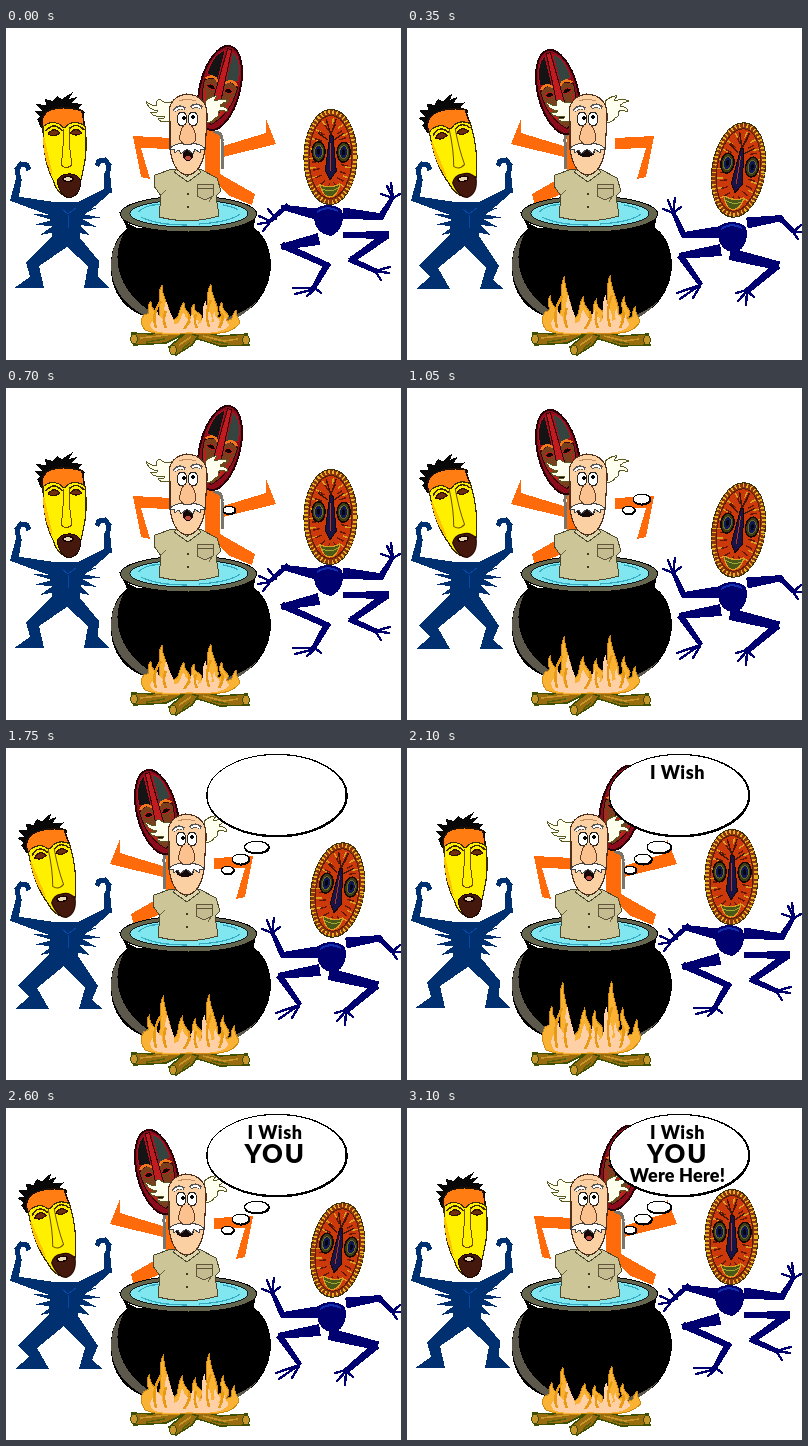
These frames come from a looping animation (395x332 px, 5.1 s). An HTML page:

```html
<!DOCTYPE html>
<html lang="en">
<head>
<meta charset="utf-8">
<title>I Wish You Were Here</title>
<style>
html, body { margin: 0; width: 100%; height: 100%; overflow: hidden; background: #fff; }
svg { display: block; width: 100vw; height: 100vh; shape-rendering: crispEdges; }
text { font-family: Lato, "Open Sans", sans-serif; font-weight: 900; text-anchor: middle; }
</style>
</head>
<body>
<svg id="stage" viewBox="0 0 395 332"></svg>
<script>
const stage = document.getElementById('stage');
const NAVY = '#003070', BLUE = '#000070', ORANGE = '#ff6a0a', OLIVE = '#5a5a20';

const path = (d, fill, stroke = 'none', w = 1) =>
  `<path d="${d}" fill="${fill}" stroke="${stroke}" stroke-width="${w}" stroke-linejoin="round"/>`;
const line = (d, stroke, w = 1, extra = '') =>
  `<path d="${d}" fill="none" stroke="${stroke}" stroke-width="${w}" ${extra}/>`;
const oval = (x, y, rx, ry, fill, stroke = 'none', w = 1, extra = '') =>
  `<ellipse cx="${x}" cy="${y}" rx="${rx}" ry="${ry}" fill="${fill}" stroke="${stroke}" stroke-width="${w}" ${extra}/>`;
const group = (id, body) => `<g id="${id}">${body}</g>`;
const move = (body, transform) => `<g transform="${transform}">${body}</g>`;
const at = (body, x, y, turn) => move(body, `translate(${x} ${y}) rotate(${turn})`);

// Limb segment that narrows from width w1 to w2
function taper(x1, y1, w1, x2, y2, w2, fill) {
  const len = Math.hypot(x2 - x1, y2 - y1), nx = (y1 - y2) / len / 2, ny = (x2 - x1) / len / 2;
  return path(`M${x1 + nx * w1} ${y1 + ny * w1}L${x2 + nx * w2} ${y2 + ny * w2}` +
    `L${x2 - nx * w2} ${y2 - ny * w2}L${x1 - nx * w1} ${y1 - ny * w1}Z`, fill);
}

// Long dark red mask, drawn around 0,0
const redMask = [
  oval(0, 0, 20, 43, '#8c0c1c', '#280008', 2),
  path('M-4-38Q-15-32-16-11L-4-7Z', '#141414', '#b01020'),
  path('M4-38Q15-32 16-11L4-7Z', '#34443f', '#b01020'),
  path('M-17-4Q-9-12 0-3Q9-12 17-4Q17 22 0 38Q-17 22-17-4Z', '#7a3f1c', '#300808'),
  line('M-16-6Q-9-13-3-5M16-6Q9-13 3-5', '#f07818', 2.5),
  path('M-14 1Q-9-5-4 2Q-9 5-14 1ZM14 1Q9-5 4 2Q9 5 14 1Z', '#100808', '#c02018'),
  path('M-2-40H2L4 13H-4Z', '#c01c20', '#300008'),
  line('M-14 6Q-12 20-6 28M14 6Q12 20 6 28', '#c01c20', 2),
  oval(0, 23, 7, 5, '#180808', '#c02a18', 1.5)
].join('');

// Yellow mask with spiky hair
const yellowMask = [
  path('M35 100L31 91L34 89L28 83L36 83L30 76L40 77L39 71L47 73L51 68L56 71L67 64L63 71L71 69L66 75L77 76L72 80L79 84L76 92Z', '#080808'),
  path('M36 98Q35 86 44 82Q58 77 76 83L79 100L72 107L39 108Z', '#ff7d13', '#201000', 1.5),
  path('M37 99Q44 92 53 96L58 100L63 96Q70 92 79 98Q82 123 77 143Q73 166 63 169Q52 168 47 152Q37 134 37 99Z', '#fff000', '#3c2c00', 1.2),
  path('M38 108L47 148Q38 135 37 110Z', '#ffc000'),
  path('M42 106Q48 98 54 105Q48 110 42 106ZM64 105Q70 98 76 105Q70 109 64 105Z', '#703010', '#301000', 1.2),
  line('M40 103Q48 93 56 103M62 102Q70 93 78 102', '#402800', 1.5),
  path('M57 100Q58 120 55 137Q60 142 66 137Q63 120 63 100', '#fff000', '#6e4b00', 1),
  path('M51 153Q54 146 62 146Q71 145 75 153Q74 168 63 170Q54 168 51 153Z', '#44180c', '#200800'),
  oval(62, 151, 5, 2.5, '#e8d8b0', '#180000', 1.5)
].join('');

// Round carved mask, drawn around 0,0
const ring = (rx, ry, c, w, dash) => oval(0, 0, rx, ry, 'none', c, w, `stroke-dasharray="${dash}"`);
const carvedEye = x => oval(x, -5, 6.5, 10, '#3c3c14', '#140800', 1.5) +
  oval(x, -5, 4, 6.5, '#101858', '#6b6b28') + oval(x, -5, 1.6, 3, '#050510');
const carvedMask = [
  oval(0, 0, 26.5, 47.5, '#8c3410', '#403008', 1.2),
  ring(24.5, 45, '#e8b020', 4, '1.6 2.4'),
  oval(0, 0, 21.5, 41.5, '#cc3a0c', '#582009'),
  ring(18, 36, '#d8a020', 6, '1.4 8'),
  ring(15, 30, '#641808', 7, '1.4 6'),
  line('M-5-38L0-22L5-38M-13-24L-3-17M13-24L3-17', '#401808', 1.5),
  carvedEye(-12), carvedEye(13),
  path('M-1-22H2L6 14L0 23L-5 14Z', '#181448', '#180805'),
  line('M0-14V14', '#b03820', 1),
  path('M-10 28Q0 32 10 27Q7 40 0 40Q-7 40-10 28Z', '#4c5818', '#d8a020', 1.2),
  line('M-8 32Q0 36 8 31', '#a0a830')
].join('');

// Back dancer: the second pose mirrors the body
const backBody = path('M127 108L166 110V121L135 120L144 151L135 149Z', ORANGE) +
  path('M199 102L214 104V146L249 166L246 177L224 168L199 145Z', ORANGE) +
  path('M217 118L260 105V91L270 116L217 129Z', ORANGE) +
  line('M207 104Q217 103 216 114V141', '#77756c', 3);
const backA = backBody + at(redMask, 214, 60, 14);
const backB = move(backBody, 'translate(374 0) scale(-1 1)') + at(redMask, 151, 64, -14);

// Left dancer
const ribs = path('M50 182L31 177L47 187L26 186L46 192L28 197L47 198L34 207L50 204' +
  'L43 215L58 208L71 216L68 204L84 207L73 197L91 199L76 191L96 190L76 186L91 180L74 182Z', NAVY) +
  line('M56 181L62 186L70 180M62 187V200', '#0848a8');
const hook = (x, y, side) => line(`M${x} ${y}l${side * -2} -12l${side * 4} -5l${side * 6} 1l${side * 2} 5`, NAVY, 5);
const arms = taper(51, 182, 15, 8, 171, 6, NAVY) + taper(8, 174, 8, 13, 150, 6, NAVY) + hook(13, 153, 1) +
  taper(73, 182, 15, 103, 162, 6, NAVY) + taper(102, 165, 8, 101, 145, 6, NAVY) + hook(101, 149, -1);
const leftA = arms + path('M47 174H76L74 210L93 233L92 248L103 260H78L82 238L61 219L33 238L38 260H8L24 249L20 234L46 208Z', NAVY) +
  ribs + yellowMask;
const leftB = arms + path('M45 174H75L72 208L92 238L86 252L97 261H73L79 240L58 218L31 240L43 261H9L23 249L12 238L43 206Z', NAVY) +
  ribs + move(yellowMask, 'translate(-7 0) rotate(-10 62 145)');

// Right dancer
const bone = (...p) => taper(...p, BLUE);
const fingers = d => line(d, BLUE, 2.4, 'stroke-linecap="round"');
const torso = (x, y) => path(`M${x - 14} ${y - 9}Q${x} ${y - 19} ${x + 14} ${y - 9}Q${x + 18} ${y + 10} ${x + 3} ${y + 17}Q${x - 16} ${y + 14} ${x - 14} ${y - 9}Z`, BLUE) +
  line(`M${x - 11} ${y - 7}Q${x} ${y - 14} ${x + 10} ${y - 8}`, '#1030b0', 2);
const rightA = bone(310, 186, 11, 275, 179, 5) + bone(282, 177, 5, 263, 194, 4) +
  fingers('M264 193L253 188M264 194L252 196M264 194L257 203M270 191L262 181') +
  bone(337, 185, 11, 376, 189, 7) + bone(374, 190, 7, 387, 169, 4) +
  fingers('M387 170L375 166M387 170L381 158M387 170L385 155M387 170L394 166') +
  bone(313, 211, 12, 275, 219, 6) + bone(276, 217, 7, 323, 238, 6) + bone(322, 235, 7, 307, 261, 5) +
  bone(337, 207, 5, 383, 207, 9) + bone(381, 207, 8, 344, 233, 6) + bone(343, 231, 6, 370, 243, 5) +
  fingers('M309 260L287 260M309 261L289 266M309 261L301 268M309 260L315 265M369 243L384 239M369 243L383 245M369 243L375 252') +
  torso(322, 191) + at(carvedMask, 324.5, 129, 1);
const rightB = bone(314, 204, 12, 274, 207, 5) + bone(277, 208, 6, 266, 184, 4) +
  fingers('M266 185L256 181M266 185L261 172M266 185L268 170M266 185L274 179') +
  bone(340, 195, 11, 375, 190, 6) + bone(373, 190, 6, 388, 205, 4) +
  fingers('M386 204L394 197M386 204L395 204M386 204L391 211') +
  bone(314, 222, 12, 272, 228, 6) + bone(273, 227, 7, 294, 257, 5) +
  fingers('M293 257L270 265M293 257L273 271M293 258L286 270') +
  bone(323, 226, 12, 372, 238, 9) + bone(371, 237, 8, 340, 263, 6) +
  fingers('M340 262L329 265M340 263L331 273M340 264L339 277M340 263L347 269') +
  torso(325, 208) + at(carvedMask, 331.5, 142, 9);

const pot = [
  path('M122 200C102 212 98 252 116 273C138 303 230 304 252 273C271 250 269 212 246 198Z', '#000'),
  path('M118 205C100 220 101 255 119 273Q142 297 182 297Q150 291 130 272C109 250 107 225 118 205Z', '#5c584c'),
  path('M210 296Q236 292 250 274Q236 287 210 292Z', '#5c584c'),
  path('M113 183Q118 206 182 207Q246 206 252 179L247 202Q236 213 182 214Q128 213 122 203Z', '#000'),
  oval(182.5, 186, 68, 18, '#66664f', '#000', 1),
  oval(183, 185.5, 59, 13.5, '#80e6f0', '#101c1e', 1),
  line('M132 184Q142 175 158 177M135 189Q150 197 181 197M193 196Q224 194 234 186M217 177Q228 179 232 182', '#35a9bf', 1.2)
].join('');

const chef = [
  path('M149 147L166 141L194 141L211 150L215 163L210 168L213 188Q183 197 153 189L155 168L148 158Z', '#ccc598', '#4c462c', 1),
  path('M172 140L181 149L191 140L195 144L182 154L168 144Z', '#dcd6ae', '#4c462c'),
  line('M155 167L160 162M207 167L203 174', '#706447'),
  path('M191 156H207V168L199 172L191 168Z', '#c4bc90', '#5c553a'),
  line('M191 160H207', '#5c553a'),
  oval(182, 166, 1.5, 1.5, '#40391f'), oval(182, 179, 1.5, 1.5, '#40391f'),
  path('M167 91Q157 97 152 91Q160 91 158 88Q148 90 144 84Q151 86 152 83Q142 82 140 73Q146 79 151 77Q149 73 154 71Q159 77 168 73Z', '#fffff0', OLIVE),
  path('M199 73Q207 67 211 68L208 73Q217 70 223 73Q215 75 214 78Q222 79 222 84Q215 81 212 84Q214 89 209 90Q207 94 201 95Z', '#fffff0', OLIVE),
  path('M164 94Q159 70 180 66Q203 67 201 92L199 122Q195 146 181 147Q167 145 164 120Z', '#fbd0a2', '#50301d', 1.2),
  line('M173 73Q181 70 190 73', '#c78b60'),
  oval(176, 91, 5, 7, '#fff', '#252525'), oval(187, 91, 5, 7, '#fff', '#252525'),
  oval(178, 90, 1.8, 2.2, '#000'), oval(187, 89, 1.8, 2.2, '#000'),
  line('M168 83Q173 77 179 81M185 80Q190 75 196 80', '#555', 4),
  line('M169 83Q173 78 178 81M186 80Q190 76 195 80', '#fff', 2),
  '<g id="mouth"></g>',
  path('M178 97Q173 104 174 112Q181 122 189 113Q191 104 185 97', '#fbc18e', '#633924'),
  path('M181 117Q169 113 163 122L168 121L168 125L173 122L175 126L181 121L187 126L189 121L194 125L195 121L200 122Q194 113 181 117Z', '#fff', '#444')
].join('');

// Tongues of fire: tip x, tip y, valley x, valley y
const tongues = [[145, 273, 149, 291], [156, 257, 165, 293], [178, 274, 181, 293],
  [188, 276, 195, 292], [205, 256, 211, 290], [216, 274, 220, 293], [230, 282, 227, 301]];
function flamePath(k, sway) {
  const y = v => 304 - (304 - v) * k;
  let d = `M139 302Q132 ${y(294)} 138 ${y(287)}`, px = 138, py = y(287);
  tongues.forEach(([tx, ty, vx, vy], i) => {
    const x = tx + sway * (i % 2 ? 1 : -1);
    d += `C${px + 11} ${py - 3} ${x - 8} ${y(ty + 10)} ${x} ${y(ty)}` +
         `C${x - 1} ${y(ty + 12)} ${x + 11} ${y(vy - 9)} ${vx} ${y(vy)}`;
    px = vx; py = y(vy);
  });
  return d + 'Q217 308 183 305Q155 309 139 302Z';
}
function flames(k, sway) {
  const d = flamePath(k, sway);
  return path(d, '#f9b233', '#d08a10') + move(path(d, '#ffd0a5'), 'translate(36 106) scale(.8 .65)') +
    line(`M150 300q-5 ${-14 * k} 5 ${-27 * k}M160 300q-4 ${-9 * k} 0 ${-17 * k}M178 301q7 ${-8 * k} 5 ${-15 * k}` +
      `M191 300q-4 ${-7 * k} -1 ${-14 * k}M203 299q-5 ${-14 * k} 2 ${-27 * k}M213 300q5 ${-8 * k} 3 ${-15 * k}`, '#e89a14', 2.5);
}

const BARK = '#3c5000';
const log = (d, x, y) => path(d, '#9a6c10', BARK, 1.5) + oval(x, y, 3.5, 4.5, '#c8942c', BARK);
const logs = log('M126 305L146 306L168 301L176 307L160 315L128 317Z', 128, 311) +
  log('M191 302L214 308L241 306L243 317L214 318L186 309Z', 240, 312) +
  log('M163 319L181 304L192 308L186 317L170 327Z', 167, 322) +
  line('M134 310L162 307M197 308L218 313L232 311M173 317L185 309', '#c89428', 1.6) +
  line('M140 314L159 311M206 313L222 316M176 321L184 315', '#56600c', 1.5);

const bubble = (x, y, rx, ry, w) => oval(x + 0.5, y + 0.6, rx, ry, '#000', '#000', w) + oval(x, y, rx, ry, '#fff', '#000', 1);
const puffs = [[223, 122, 6, 3.8], [236, 111, 8.5, 5], [252, 99, 12, 5.8]];
const words = [['I Wish', 30.5, 18, 0.5], ['YOU', 55, 25.5, 1.8], ['Were Here!', 74, 18, 0.2]];

stage.innerHTML = group('backA', backA) + group('backB', backB) + group('leftA', leftA) + group('leftB', leftB) +
  group('rightA', rightA) + group('rightB', rightB) + pot + group('chef', chef) + logs +
  group('fire', '') + group('thought',
    puffs.map(p => `<g class="thought">${bubble(...p, 2)}</g>`).join('') +
    `<g class="thought">${bubble(272, 47, 69.5, 40.5, 2.5)}</g>` +
    words.map(([s, y, size, gap]) =>
      `<text class="thought" x="270.5" y="${y}" font-size="${size}" letter-spacing="${gap}">${s}</text>`).join(''));

// Start time, flame height, thought parts shown
const beats = [[0, 1, 0], [350, 1.18, 0], [700, 1, 1], [1050, 1.18, 2], [1400, 1.08, 3],
  [1750, 1.2, 4], [2100, 1.48, 5], [2600, 1.22, 6], [3100, 0.95, 7]];
const el = id => document.getElementById(id);
const parts = [...document.querySelectorAll('.thought')];
const show = (node, on) => node.setAttribute('visibility', on ? 'visible' : 'hidden');
let shown = -1;

function update(time) {
  const t = time % 5100;
  const i = beats.findLastIndex(b => t >= b[0]);
  if (i === shown) return;
  shown = i;
  const [, heat, count] = beats[i], odd = i % 2;
  for (const who of ['back', 'left', 'right']) {
    show(el(who + 'A'), !odd);
    show(el(who + 'B'), odd);
  }
  el('mouth').innerHTML = odd ? oval(180, 124, 9, 5, '#170808') :
    oval(182, 127, 5, 6, '#170808') + oval(182, 130, 3, 2, '#bd4a3c');
  el('chef').setAttribute('transform', odd ? 'translate(-1 0)' : '');
  el('thought').setAttribute('transform', odd ? 'translate(-1.5 0)' : '');
  parts.forEach((p, n) => show(p, n < count));
  el('fire').innerHTML = flames(heat, odd ? 1.5 : 0);
}

const start = performance.now();
function tick() {
  update(performance.now() - start);
  requestAnimationFrame(tick);
}
tick();
</script>
</body>
</html>
```
